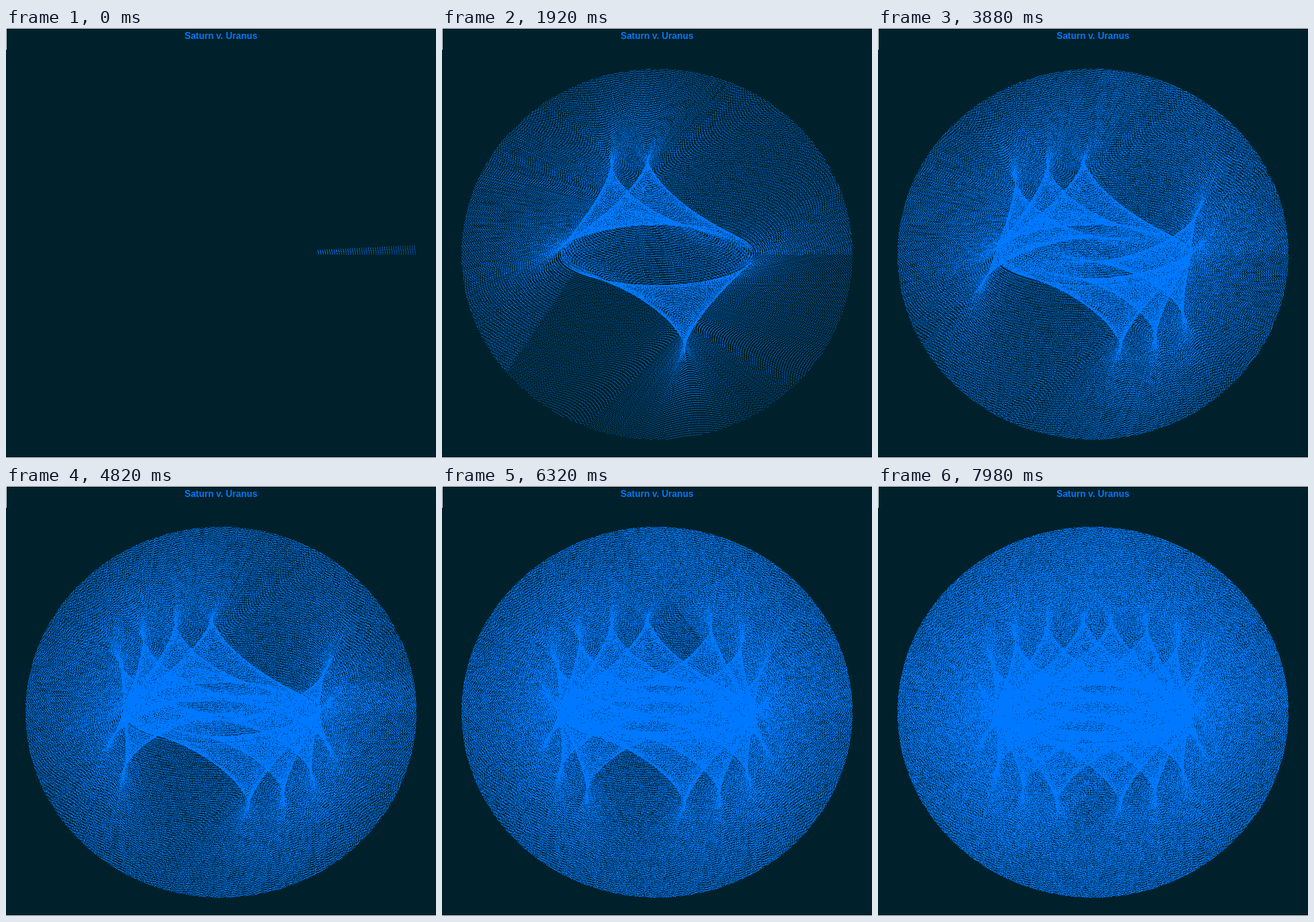
Write an HTML page with a canvas that moves like this. It is 749x748 px and loops after 8000 ms.

```html
<!DOCTYPE html>
<html lang="en">
<head>
<meta charset="utf-8">
<title>Saturn v. Uranus</title>
<style>
  html, body { margin: 0; width: 100%; height: 100%; overflow: hidden; background: #00212b; }
  canvas { display: block; }
</style>
</head>
<body>
<canvas id="stage" width="749" height="748"></canvas>
<script>
const LOOP = 8000, TICK = 20;
const CX = 374, CY = 393;
const OUTER = { rx: 340, ry: 322 };
const INNER = { rx: 170, ry: 54 };
const RATIO = 2.8517;                       // Uranus period / Saturn period
const LINES_PER_TICK = 18, FIRST_LINES = 9;
const STEP = 6.0086 / LINES_PER_TICK * Math.PI / 180;
const DOT_GAP = 4;
const BACK = "#00212b", BLUE = "#0078ff";

const ctx = document.getElementById("stage").getContext("2d");
let drawn = 0;

function orbit({ rx, ry }, angle) {
  return [Math.round(CX + rx * Math.cos(angle)), Math.round(CY - ry * Math.sin(angle))];
}

function reset() {
  ctx.fillStyle = BACK;
  ctx.fillRect(0, 0, 749, 748);
  ctx.fillStyle = "#fff";
  ctx.fillRect(0, 0, 749, 1);
  ctx.fillRect(0, 747, 749, 1);
  ctx.fillRect(0, 0, 1, 38);
  ctx.fillStyle = BLUE;
  ctx.font = "bold 16px 'Liberation Sans', Arial, sans-serif";
  ctx.fillText("Saturn v. Uranus", 311, 19);
  drawn = 0;
}

// Dotted line from the inner planet to the outer one, stepped along its longer axis
function dottedLine(n) {
  const angle = n * STEP;
  const [x0, y0] = orbit(INNER, angle * RATIO);
  const [x1, y1] = orbit(OUTER, angle);
  const dx = x1 - x0, dy = y1 - y0;
  const span = Math.max(Math.abs(dx), Math.abs(dy));
  for (let d = 0; d <= span; d += DOT_GAP) {
    ctx.fillRect(Math.round(x0 + dx * d / span), Math.round(y0 + dy * d / span), 1, 1);
  }
}

function render(time) {
  const tick = Math.floor((time % LOOP) / TICK);
  const total = FIRST_LINES + tick * LINES_PER_TICK;
  if (total < drawn) reset();
  while (drawn < total) dottedLine(drawn++);
}

reset();
render(0);
const start = performance.now();
function loop() {
  render(performance.now() - start);
  requestAnimationFrame(loop);
}
requestAnimationFrame(loop);
</script>
</body>
</html>
```
